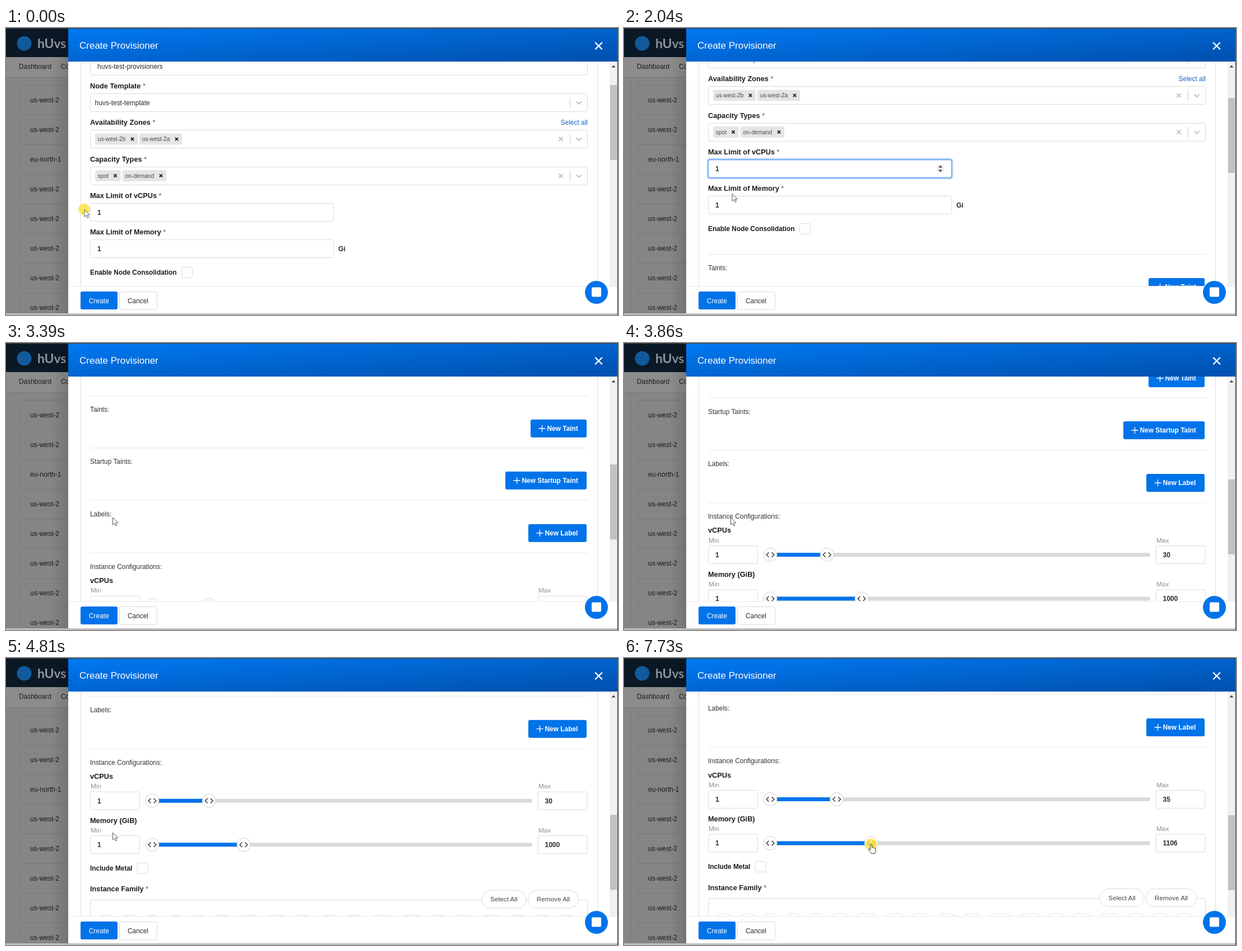
Recreate the animation shown at these times as an HTML page. Size 1092 by 513 pixels, loop 8 s.

```html
<!DOCTYPE html>
<html lang="en">
<head>
<meta charset="utf-8">
<title>Create Provisioner</title>
<style>
  html, body { margin: 0; width: 100%; height: 100%; overflow: hidden; background: #858585; }
  svg { display: block; width: 100vw; height: 100vh; font-family: "Liberation Sans", Arial, sans-serif; }
</style>
</head>
<body>
<svg id="stage" viewBox="0 0 1092 513"></svg>
<script>
const LOOP = 8000, STEP = 200 / 3;
const BLUE = '#0073e9', INK = '#2b2b2b', LINE = '#dcdcdc';

// ---- drawing helpers: y is the vertical centre of a text ----
const text = (x, y, str, { size = 11.95, fill = INK, bold = false, more = '' } = {}) =>
  `<text x="${x}" y="${y + size * 0.355}" font-size="${size}" fill="${fill}"${bold ? ' font-weight="700"' : ''} ${more}>${str}</text>`;
const rect = (x, y, w, h, fill, more = '') =>
  `<rect x="${x}" y="${y}" width="${w}" height="${h}" fill="${fill}" ${more}/>`;
const path = (d, stroke, width = 1, more = '') =>
  `<path d="${d}" fill="none" stroke="${stroke}" stroke-width="${width}" ${more}/>`;
const box = (x, y, w, h, r = 3) => rect(x, y, w, h, '#fff', `rx="${r}" stroke="${LINE}"`);
const rule = y => path(`M150 ${y}H1038`, '#e8e8e8');
const cross = (x, y, r, stroke, width) =>
  path(`M${x - r} ${y - r}l${2 * r} ${2 * r}m0 ${-2 * r}l${-2 * r} ${2 * r}`, stroke, width);

const label = (y, str, star = true) =>
  text(150, y, str + (star ? ' <tspan font-weight="400" fill="#555">*</tspan>' : ''),
    { size: 12.75, bold: true, fill: '#1c1c1c' });
const note = (y, str) => text(150, y, str, { size: 11.9, fill: '#333' });
const checkbox = (x, y, str) =>
  text(150, y, str, { size: 11.9, bold: true, fill: '#1c1c1c' }) + box(x, y - 9.5, 19, 19, 2);
const field = (x, y, w, value, id = '') =>
  box(x, y, w, 32) + text(x + 12.5, y + 16.2, value, { size: 12, bold: true, more: id && `id="${id}"` });

function select(y, clearable) {
  const mid = y + 16;
  return box(150.5, y, 887, 32) + path(`M1006.5 ${mid - 9}V${mid + 9}`, '#ccc') +
    path(`M1017.5 ${mid - 2}l4.5 4.5l4.5 -4.5`, '#bdbdbd', 1.8) +
    (clearable ? cross(990, mid, 3.6, '#bdbdbd', 1.8) : '');
}

function tag(x, y, w, str) {
  return rect(x, y - 10, w, 20, '#e5e5e5', 'rx="2"') +
    text(x + 4.8, y, str, { size: 10.15, fill: '#4a4a4a' }) + cross(x + w - 9.5, y, 2.6, '#111', 1.6);
}

function addButton(x, y, str) {
  const mid = y + 16;
  return rect(x, y, 1036 - x, 32, BLUE, 'rx="3"') +
    path(`M${x + 14.5} ${mid}h12m-6 -6v12`, '#fff', 1.3) +
    text(x + 29.5, mid, str, { bold: true, fill: '#fff', size: 11.9 });
}

function pill(x, y, w, str) {
  return box(x, y, w, 32, 16) +
    text(x + w / 2, y + 16, str, { size: 11.75, fill: '#444', more: 'text-anchor="middle"' });
}

const knob = (id, x, y) =>
  `<g id="${id}" transform="translate(${x} ${y})"><circle r="12" fill="#fff" stroke="#cfcfcf"/>` +
  path('M-2.6 -4.3l-4.3 4.3l4.3 4.3M2.6 -4.3l4.3 4.3l-4.3 4.3', '#333', 1.4) + '</g>';

function slider(name, y, title, max) {
  const mid = y + 16, caption = { size: 11.8, fill: '#8c8c8c' };
  return label(y - 27.5, title, false) +
    text(151, y - 10, 'Min', caption) + text(950, y - 10, 'Max', caption) +
    field(150.5, y, 88, 1) + field(949, y, 88, max, name + 'Max') +
    rect(261, mid - 3.5, 678, 7, '#dadada', 'rx="3.5"') +
    rect(261, mid - 3.5, 0, 7, BLUE, `id="${name}Fill"`) +
    knob(name + 'Low', 261, mid) + knob(name + 'High', 261, mid);
}

// ---- number inputs that react to hover and focus ----
const inputs = [
  { x: 150.5, y: 313.5, w: 434 },
  { x: 150.5, y: 378.5, w: 434 },
  { x: 150.5, y: 840.5, w: 88 },
  { x: 150.5, y: 919, w: 88 }
];
const halo = ({ x, y, w }, i) =>
  `<g id="ring${i}">` + rect(x - 1.5, y - 1.5, w + 3, 35, 'none', 'rx="4" stroke="#bdd8fa" stroke-width="3"') +
  rect(x, y, w, 32, 'none', 'rx="3" stroke="#5c9ff0" stroke-width="1.3"') + '</g>';
const spinner = ({ x, y, w }, i) => {
  const cx = x + w - 20, cy = y + 16;
  return `<g id="spin${i}">` + rect(cx - 6.5, cy - 7, 13, 14, '#efefef') +
    `<path d="M${cx - 3.5} ${cy - 2}h7l-3.5 -4zM${cx - 3.5} ${cy + 2}h7l-3.5 4z" fill="#444"/></g>`;
};

function families() {
  const widths = [35, 36, 34, 35, 33, 40, 45, 41, 41, 40, 40, 47, 46, 37, 42, 43, 39, 37, 36];
  let x = 162;
  return widths.map(w => {
    const shape = box(x, 1061, w, 30, 15);
    x += w + 6;
    return shape;
  }).join('');
}

const form = () =>
  path('M133.5 0V1300M1055.5 0V1300', LINE) +
  box(150.5, 52, 887, 32) + text(163, 68.5, 'huvs-test-provisioners') +
  label(103.5, 'Node Template') + select(117.5, false) + text(158.5, 133.5, 'huvs-test-template') +
  label(168.8, 'Availability Zones') + text(1038, 168.8, 'Select all', { fill: '#1565c8', more: 'text-anchor="end"' }) +
  select(182.5, true) + tag(159, 198.5, 76, 'us-west-2b') + tag(238, 198.5, 76, 'us-west-2a') +
  label(234, 'Capacity Types') + select(248.3, true) + tag(159, 264, 45.5, 'spot') + tag(208, 264, 78, 'on-demand') +
  label(299.5, 'Max Limit of vCPUs') + field(150.5, 313.5, 434, 1) +
  label(364.8, 'Max Limit of Memory') + field(150.5, 378.5, 434, 1) +
  text(593, 394.5, 'Gi', { bold: true, size: 12 }) +
  checkbox(313.5, 437, 'Enable Node Consolidation') +
  rule(482.5) + note(507, 'Taints:') + addButton(936, 525, 'New Taint') +
  rule(576) + note(600.5, 'Startup Taints:') + addButton(891, 618, 'New Startup Taint') +
  rule(669.5) + note(694, 'Labels:') + addButton(932, 712, 'New Label') +
  rule(763.3) + note(788, 'Instance Configurations:') +
  slider('cpu', 840.5, 'vCPUs', 30) + slider('mem', 919, 'Memory (GiB)', 1000) +
  checkbox(234, 977, 'Include Metal') +
  label(1014.2, 'Instance Family') + box(150.5, 1033.5, 887, 200) +
  pill(849, 1016.5, 79, 'Select All') + pill(931.5, 1016.5, 90, 'Remove All') + families() +
  inputs.map((f, i) => halo(f, i) + spinner(f, i)).join('');

function backdrop() {
  const regions = ['us-west-2', 'us-west-2', 'eu-north-1', 'us-west-2', 'us-west-2', 'us-west-2', 'us-west-2', 'us-west-2'];
  return rect(0, 0, 1092, 513, '#858585') + rect(0, 0, 111, 52, '#0b1826') +
    '<circle cx="32.5" cy="27.5" r="13" fill="#125a9c"/>' +
    text(56, 27.5, 'hUvs', { size: 23, bold: true, fill: '#8f959b', more: 'font-family="Lato, sans-serif"' }) +
    rect(0, 52, 111, 36, '#8c8c8c') + path('M0 88.5H111', '#777') +
    text(23, 69, 'Dashboard', { fill: '#1d1d1d', size: 11.9 }) + text(98, 69, 'Co', { fill: '#1d1d1d', size: 11.9 }) +
    path('M12.5 89V510M25.5 89V510', '#7d7d7d') +
    regions.map((r, i) => path(`M26 ${102.5 + 53 * i}H111`, '#787878') +
      text(43, 129 + 52.95 * i, r, { size: 12, fill: '#1a1a1a' })).join('') +
    rect(81, 1, 30, 510, 'url(#shade)');
}

const cursors =
  `<circle id="click" r="10.3" fill="#ffe03a" fill-opacity=".82"/>
  <path id="arrow" d="M.5 .5V13.5L3.6 10.7L5.8 15.4L7.9 14.5L5.8 9.9H9.7Z" fill="#fff" stroke="#444" stroke-width=".9"/>
  <path id="beam" d="M-3 -6.5H-1Q0 -6.5 0 -5.5Q0 -6.5 1 -6.5H3M0 -5.5V5.5M-3 6.5H-1Q0 6.5 0 5.5Q0 6.5 1 6.5H3" fill="none" stroke="#222" stroke-width="1.2"/>
  <path id="hand" d="M-1.2 8V1Q-1.2 -.5 .2 -.5T1.6 1V5.5Q3.6 4.8 4 6.3Q5.8 5.6 6.2 7Q8 6.6 8 8.4V11.5Q8 14 6.6 16.5H.4Q-.6 14.5 -2.8 12.3Q-5.3 9.6 -4.6 8.6Q-3.6 7.4 -1.2 10Z" fill="#fff" stroke="#333" stroke-width="1"/>`;

document.getElementById('stage').innerHTML =
  `<defs>
    <linearGradient id="bar" x1=".1" y1="0" x2="1" y2=".8"><stop stop-color="#0077ef"/><stop offset="1" stop-color="#0053b2"/></linearGradient>
    <linearGradient id="shade"><stop stop-color="#000" stop-opacity="0"/><stop offset="1" stop-color="#000" stop-opacity=".13"/></linearGradient>
    <clipPath id="view"><rect x="111" y="60" width="966" height="403"/></clipPath>
  </defs>` +
  backdrop() + rect(111, 1, 980, 510, '#fff') +
  `<g clip-path="url(#view)"><g id="form">${form()}</g></g>` +
  rect(1077, 60, 14, 403, '#f1f1f1') + '<path d="M1080.5 70.5h7l-3.5 -4z" fill="#444"/>' +
  rect(1078, 102, 12, 134, '#c1c1c1', 'id="thumb"') +
  rect(111, 1, 980, 59, 'url(#bar)') + text(131, 31, 'Create Provisioner', { size: 17, fill: '#fff' }) +
  cross(1057.5, 32, 6.3, '#fff', 2.3) +
  rect(111, 461, 966, 2, '#f3f3f3') + rect(111, 463, 980, 47, '#fff') +
  rect(133, 471, 66, 32, BLUE, 'rx="3"') + text(147.8, 487.3, 'Create', { size: 12, fill: '#fff' }) +
  box(202.5, 471.5, 67, 32) + text(217, 487.3, 'Cancel', { size: 11.9 }) +
  `<circle cx="1053.5" cy="472.5" r="20.5" fill="${BLUE}"/>` + rect(1045, 463.5, 17, 17, '#fff', 'rx="2"') +
  rect(0, 0, 1092, 1.2, '#444') + rect(0, 510, 1092, 3, '#bdbdbd') + rect(1090.7, 0, 1.3, 513, '#555') +
  `<g id="pointer">${cursors}</g>`;

// ---- motion ----
const easeIn = p => p ** 1.7;
const easeOut = p => 1 - (1 - p) ** 2;
const easeBoth = p => p * p * (3 - 2 * p);

// Keys are [time, value, easing towards this key].
function along(keys, t) {
  const next = keys.findIndex(k => k[0] > t);
  if (next < 0) return keys[keys.length - 1][1];
  if (next === 0) return keys[0][1];
  const [t0, a] = keys[next - 1], [t1, b, ease = p => p] = keys[next];
  return a + (b - a) * ease((t - t0) / (t1 - t0));
}

const scrollKeys = [
  [400, 0], [733, 78, easeBoth], [2933, 78], [3133.4, 122.4, easeIn], [3600, 448, easeOut],
  [3800, 448], [3866.7, 478], [4200, 526, easeOut], [4466.7, 526], [4533.4, 537], [4867, 604, easeOut]
];
const pointerX = [
  [800, 139.5], [1067, 200, easeBoth], [1600, 200], [2200, 190, easeBoth], [5067, 190],
  [5200, 362], [5266, 376], [6333, 376], [6667, 380], [7067, 380], [7200, 424], [7266, 438.5], [7600, 438.5], [7733, 441]
];
const pointerY = [
  [800, 324], [1067, 251, easeBoth], [1600, 251], [2200, 311.5, easeBoth], [5067, 311.5],
  [5200, 252], [7067, 252], [7200, 333]
];
const cpuKeys = [[5200, 30], [5266, 34], [6333, 34], [6467, 35]];
const memKeys = [[7200, 1000], [7266, 1089], [7600, 1089], [7733, 1106]];
const clicks = [[0, 130], [1400, 1600], [2440, 2650], [5260, 5460], [6010, 6810], [7260, LOOP]];

const el = id => document.getElementById(id);
const show = (id, on) => el(id).setAttribute('visibility', on ? 'visible' : 'hidden');

function setSlider(name, value, x, y) {
  el(name + 'Max').textContent = value;
  el(name + 'Fill').setAttribute('width', x - 261);
  el(name + 'High').setAttribute('transform', `translate(${x} ${y})`);
}

function render(time) {
  const t = Math.floor((time + 14) / STEP) * STEP + 0.1;
  const scroll = along(scrollKeys, t), x = along(pointerX, t), y = along(pointerY, t);
  el('form').setAttribute('transform', `translate(0 ${-scroll})`);
  el('thumb').setAttribute('y', 102 + scroll * 0.2965);

  const cpu = Math.round(along(cpuKeys, t)), mem = Math.round(along(memKeys, t));
  setSlider('cpu', cpu, 261 + (cpu - 1) * 3.49, 856.5);
  setSlider('mem', mem, 261 + mem * 0.163, 935);

  const focus = time < 1400 || time >= 5200 ? -1 : time < 2440 ? 0 : 1;
  let hovered = false;
  inputs.forEach((f, i) => {
    const top = f.y - scroll;
    const over = x > f.x && x < f.x + f.w && y > top && y < top + 32;
    hovered = hovered || over;
    show('ring' + i, i === focus);
    show('spin' + i, over || i === focus);
  });

  const hand = t > 5190;
  const beam = !hand && (hovered || (t > 2900 && t < 3190));
  el('pointer').setAttribute('transform', `translate(${x} ${y})`);
  show('hand', hand);
  show('beam', beam);
  show('arrow', !hand && !beam);
  show('click', clicks.some(([from, to]) => time >= from && time < to));
}

const start = performance.now();
function tick() {
  render((performance.now() - start) % LOOP);
  requestAnimationFrame(tick);
}
tick();
</script>
</body>
</html>
```
